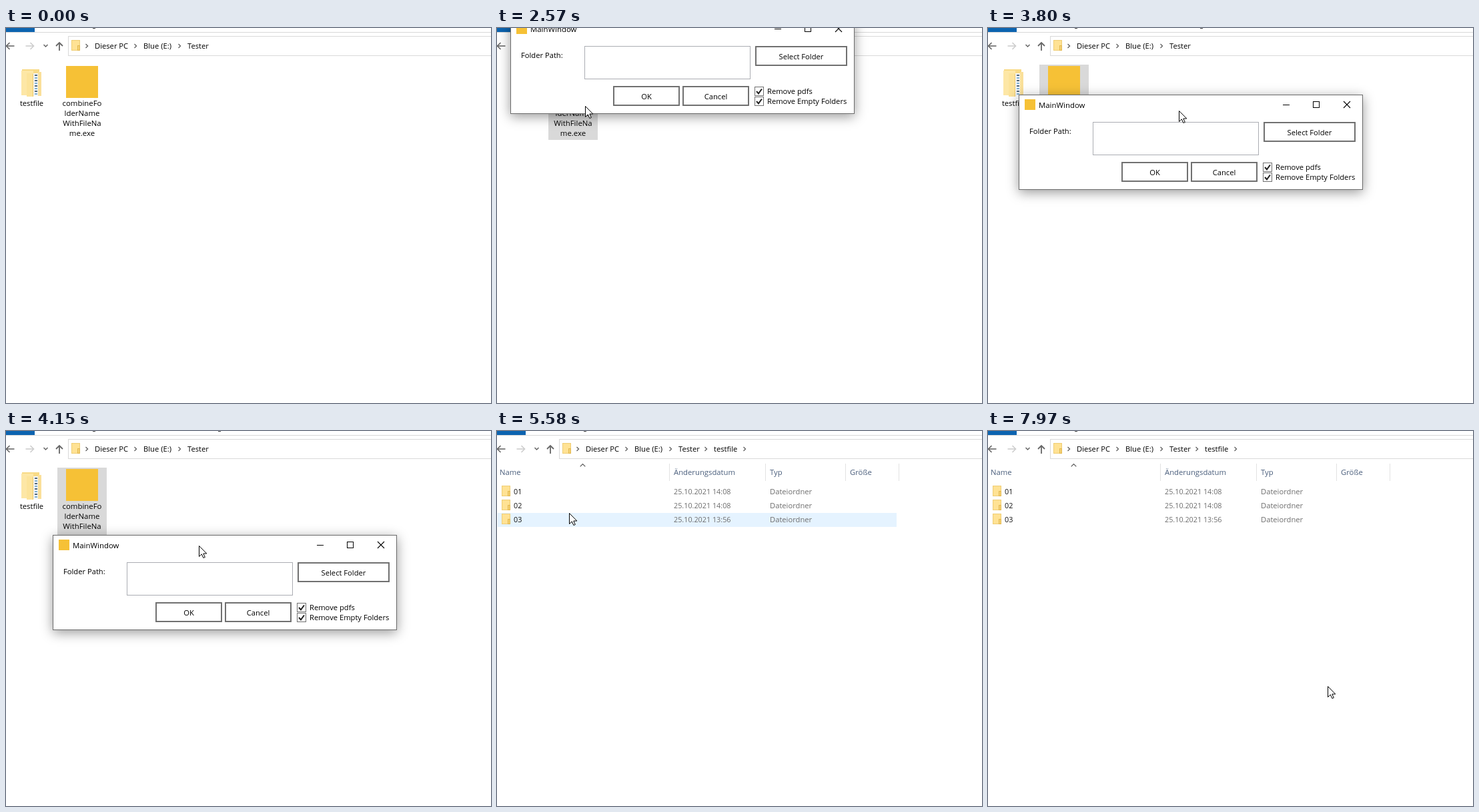
These frames come from a looping animation (727 by 563 pixels, 7990 ms). An HTML page with a canvas:

```html
<!DOCTYPE html>
<html lang="de">
<head>
<meta charset="utf-8">
<title>Explorer</title>
<style>
html, body { margin: 0; width: 100%; height: 100%; overflow: hidden; background: #fff; }
canvas { display: block; width: 727px; height: 563px; }
</style>
</head>
<body>
<canvas id="stage" width="727" height="563"></canvas>
<script>
const ctx = document.getElementById('stage').getContext('2d');
const LOOP = 7990;
const FONT = '"Open Sans", "Noto Sans", sans-serif';
const INK = '#666', YELLOW = '#f6c136', HOVER = '#e5f3ff', SELECTED = '#cce8ff', INACTIVE = '#d9d9d9';

// Moments of the hard changes, in ms
const AT = {
  cursor: 420, select: 1995, dialog: 2350, grab: 3420, drop: 4080, raise: 4580,
  folder: 4830, rows: 4940, focus: 6430, blur: 7800
};

const stop = (t, x, y) => ({ t, x, y });
const PATH = [
  stop(AT.cursor, 345, 556), stop(1200, 128, 112),          // to the program
  stop(1800, 124, 125), stop(2420, 124, 125),
  stop(3350, 257, 7), stop(AT.grab, 260, 10),               // to the title bar
  stop(3800, 286, 124), stop(AT.drop, 310, 180),            // drag
  stop(4470, 67, 90), stop(5400, 67, 90),                   // open the folder
  stop(6120, 380, 298), stop(6400, 432, 26),                // to the address bar
  stop(6530, 441, 57), stop(6930, 486, 284), stop(7640, 509, 383)
];

const slope = (a, b, k) => a && b ? (b[k] - a[k]) / (b.t - a.t) : 0;

// Speed at a stop: it rests where the direction turns
function speed(i, k) {
  const a = slope(PATH[i - 1], PATH[i], k), b = slope(PATH[i], PATH[i + 1], k);
  return a * b > 0 ? 2 * a * b / (a + b) : 0;
}

function pointerAt(t) {
  const j = PATH.findIndex(p => p.t > t);
  if (j < 1) return PATH[j < 0 ? PATH.length - 1 : 0];
  const a = PATH[j - 1], b = PATH[j], d = b.t - a.t;
  const u = (t - a.t) / d, e = u * u * (3 - 2 * u);
  const at = k => Math.round(a[k] + (b[k] - a[k]) * e +
    d * u * (1 - u) * ((1 - u) * speed(j - 1, k) - u * speed(j, k)));
  return { x: at('x'), y: at('y') };
}

function rect(x, y, w, h, color) {
  ctx.fillStyle = color;
  ctx.fillRect(x, y, w, h);
}

function frame(x, y, w, h, color, weight = 1) {
  ctx.strokeStyle = color;
  ctx.lineWidth = weight;
  ctx.strokeRect(x + weight / 2, y + weight / 2, w - weight, h - weight);
}

function line(points, color, weight = 1) {
  ctx.beginPath();
  points.forEach(([x, y]) => ctx.lineTo(x, y));
  ctx.strokeStyle = color;
  ctx.lineWidth = weight;
  ctx.stroke();
}

// Angle bracket with its tip at x, y; turns count quarters clockwise from "right"
function bracket(x, y, size, turns, color = INK, weight = 1.5, shaft = 0) {
  ctx.save();
  ctx.translate(x, y);
  ctx.rotate(turns * Math.PI / 2);
  line([[-size, -size], [0, 0], [-size, size]], color, weight);
  if (shaft) line([[-shaft, 0], [0, 0]], color, weight);
  ctx.restore();
}

// y is the middle of the capitals
function text(str, x, y, color = '#000', align = 'left', size = 11.2) {
  ctx.font = size + 'px ' + FONT;
  ctx.textAlign = align;
  ctx.fillStyle = color;
  ctx.fillText(str, x, y + 4);
}

function smallFolder(x, y) {
  rect(x, y, 13, 16, '#ffe294');
  frame(x, y, 13, 16, '#efcd74');
  rect(x + 9, y + 8, 4, 8, '#f5d276');
  frame(x + 9, y + 8, 4, 8, '#e3b850');
}

function largeFolder() {
  rect(24, 62, 26, 39, '#f8da86');
  rect(39, 68, 10, 34, '#f4f5f6');
  for (let y = 70; y < 99; y += 4) rect(43, y, 4, 2, y % 8 === 6 ? '#52677a' : '#7fb0d2');
  rect(48, 66, 5, 36, '#fae09a');
  rect(23, 64, 18, 37, '#fde7a6');
  rect(31, 68, 10, 35, '#fce39a');
  line([[40.5, 69], [40.5, 103]], '#efcb6c');
}

const chevron = x => bracket(x + 1.5, 27, 3, 0, INK, 1.4);

function toolbar(t) {
  rect(0, 6, 727, 1, '#d8d8d8');
  rect(0, 0, 43, 6, '#0c64b0');
  rect(130, 0, 4, 1, '#444');
  if (t >= AT.select && t < AT.raise) rect(318, 0, 4, 1, '#444');

  bracket(0.5, 27, 5, 2, INK, 1.6, 12);
  bracket(41.5, 27, 5, 0, '#cdcdcd', 1.6, 12);
  bracket(59.5, 28, 3, 1);
  bracket(80, 22, 5, 3, INK, 1.8, 12);

  if (t >= AT.focus && t < AT.blur) {
    frame(94, 12, 650, 30, '#0078d7');
    smallFolder(99, 19);
    rect(118, 20, 84, 15, '#0078d7');
    text('E:\\Tester\\testfile', 118, 28, '#fff', 'left', 11.1);
    if (Math.floor((t - AT.focus) / 530) % 2 === 0) rect(202, 20, 1, 15, '#f0a03c');
    return;
  }
  frame(93, 12, 650, 30, INACTIVE);
  smallFolder(98, 18);
  const crumb = (label, x) => {
    chevron(x - 12);
    text(label, x, 27);
  };
  crumb('Dieser PC', 133);
  crumb('Blue (E:)', 206);
  crumb('Tester', 272);
  if (t >= AT.folder) crumb('testfile', 325);
  if (t >= AT.rows) chevron(371);
}

const inside = (p, x, y, w, h) => p && p.x >= x && p.x < x + w && p.y >= y && p.y < y + h;

function item(x, h, pointer, chosen) {
  if (chosen) rect(x, 55, 74, h, chosen);
  else if (inside(pointer, x, 55, 74, h)) rect(x, 55, 74, h, HOVER);
}

function icons(t, pointer) {
  const raised = t >= AT.raise;
  item(77, 113, pointer, t >= AT.select && !raised && (t < AT.dialog ? SELECTED : INACTIVE));
  item(1, 68, pointer, raised && SELECTED);
  largeFolder();
  text('testfile', 38.5, 113, '#000', 'center');
  rect(90, 57, 48, 48, YELLOW);
  ['combineFo', 'lderName', 'WithFileNa', 'me.exe'].forEach((s, i) =>
    text(s, 114, 113 + 15 * i, '#000', 'center', 11.4));
}

function details(t, pointer) {
  const head = (label, x, end) => {
    text(label, x, 62, '#4a5e7c', 'left', 11.3);
    rect(end, 49, 1, 26, '#e3e3e3');
  };
  head('Name', 4, 258);
  head('Änderungsdatum', 265, 402);
  head('Typ', 409, 522);
  head('Größe', 529, 602);
  bracket(128.5, 49.5, 3.8, 3, '#555', 1.2);
  if (t < AT.rows) return;
  ['14:08', '14:08', '13:56'].forEach((clock, i) => {
    const y = 91 + 21 * i;
    if (inside(pointer, 1, y - 10, 598, 21)) rect(1, y - 10, 598, 21, HOVER);
    smallFolder(7, y - 9);
    text('0' + (i + 1), 25, y, '#111', 'left', 10.8);
    text('25.10.2021 ' + clock, 265, y, '#6d6d6d', 'left', 10.8);
    text('Dateiordner', 409, y, '#6d6d6d');
  });
}

function button(label, x, y, w) {
  frame(x, y, w, 30, '#707070', 2);
  text(label, x + w / 2, y + 15.5, '#000', 'center');
}

function checkbox(label, y) {
  frame(366, y, 14, 14, '#707070');
  line([[369, y + 7], [372, y + 10.3], [377, y + 3.5]], '#212121', 2);
  text(label, 385, y + 7);
}

// While held, the window keeps its place under the pointer
function dialog(t) {
  const hold = pointerAt(Math.min(Math.max(t, AT.grab), AT.drop));
  ctx.save();
  ctx.translate(hold.x - 240, hold.y - 24);
  ctx.shadowColor = 'rgba(0,0,0,.4)';
  ctx.shadowBlur = 17;
  ctx.shadowOffsetY = 4;
  rect(0, 0, 516, 143, '#fff');
  ctx.shadowColor = 'transparent';
  frame(0, 0, 516, 143, '#6b6b6b');

  rect(9, 7, 16, 16, YELLOW);
  text('MainWindow', 30, 16, '#000', 'left', 11.4);
  rect(396, 15, 10, 1, '#000');
  frame(441, 10, 10, 10, '#000');
  bracket(492, 15, 5, 0, '#000', 1.1);
  bracket(492, 15, 5, 2, '#000', 1.1);

  text('Folder Path:', 16, 55);
  frame(111, 41, 249, 50, '#abadb3');
  button('Select Folder', 367, 41, 138);
  button('OK', 154, 101, 100);
  button('Cancel', 258, 101, 100);
  checkbox('Remove pdfs', 102);
  checkbox('Remove Empty Folders', 117);
  ctx.restore();
}

const ARROW = new Path2D('M0 0V16L3.8 12.4 6.4 18 8.8 17 6.3 11.5H11.3Z');

function arrow({ x, y }) {
  ctx.save();
  ctx.translate(x + 0.5, y + 0.5);
  ctx.fillStyle = '#fff';
  ctx.strokeStyle = '#000';
  ctx.lineWidth = 1;
  ctx.fill(ARROW);
  ctx.stroke(ARROW);
  ctx.restore();
}

function draw(t) {
  const pointer = t >= AT.cursor ? pointerAt(t) : null;
  rect(0, 0, 727, 563, '#fff');
  toolbar(t);
  if (t < AT.folder) icons(t, pointer);
  else details(t, pointer);
  if (t >= AT.dialog && t < AT.raise) dialog(t);
  if (pointer) arrow(pointer);
}

const start = performance.now();
function tick() {
  draw((performance.now() - start) % LOOP);
  requestAnimationFrame(tick);
}
tick();
</script>
</body>
</html>
```
